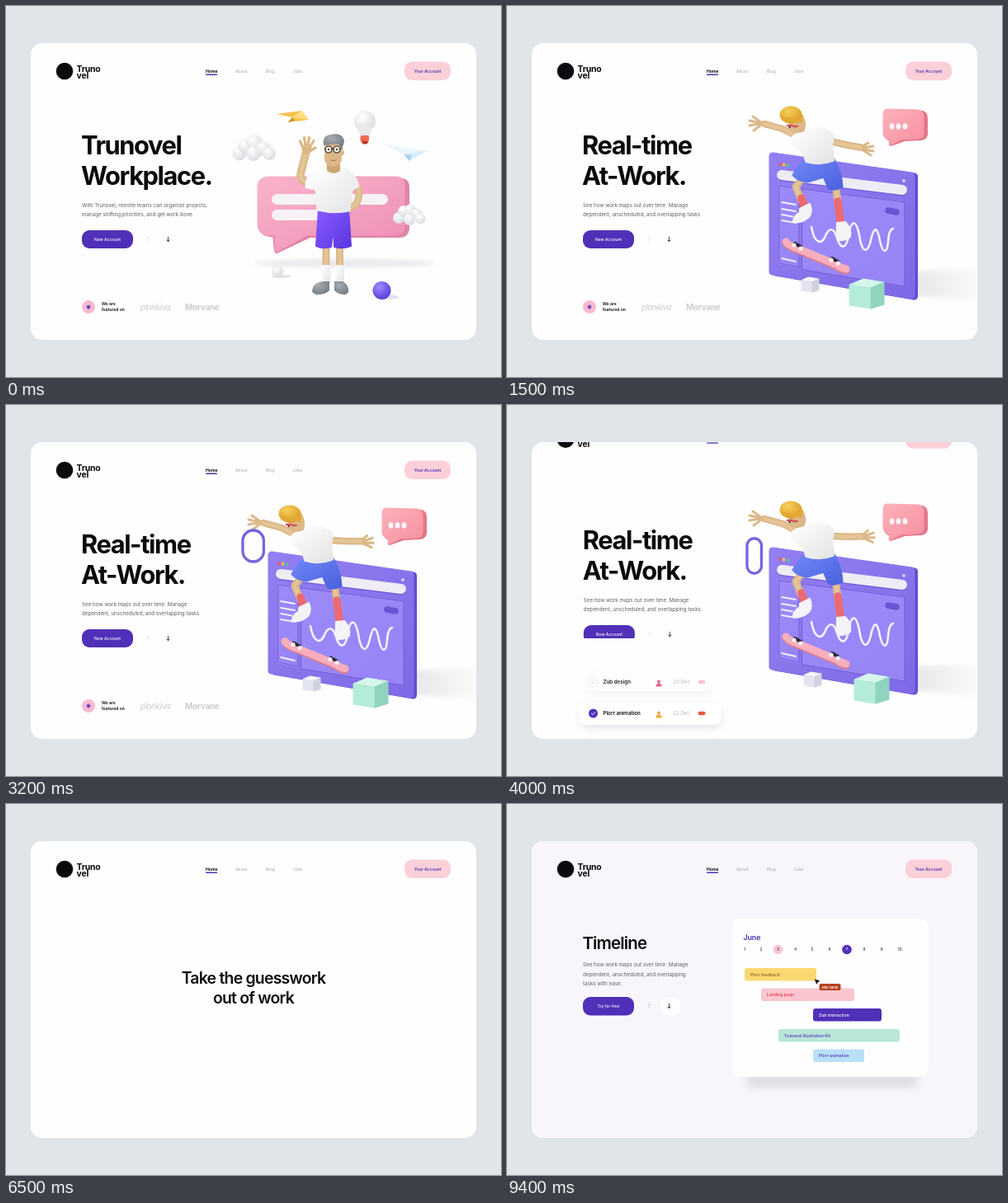
Write an HTML page that moves like this. It is 600 px wide and 450 px high and loops after 9.5 s.

```html
<!DOCTYPE html>
<html lang="en">
<head>
<meta charset="utf-8">
<title>Workplace</title>
<style>
html,body{margin:0;width:100%;height:100%;overflow:hidden;background:#e0e5e9}
svg{display:block;width:100%;height:100%}
text{font-family:Inter,Roboto,sans-serif}
.h{font-size:30.8px;font-weight:700;letter-spacing:-1.4px;fill:#0b0a0e}
.p{font-size:6.25px;fill:#5f5e66}
</style>
</head>
<body>
<svg id="stage" viewBox="0 0 600 450" preserveAspectRatio="xMidYMid meet"></svg>
<script>
const LOOP = 9500, STEP = 100, ZOOM = 0.71, PAN_X = 88, PAN_Y = 66;
const PURPLE = '#5030b8', PINK = '#fbd0d8', TAN = '#dcb888', INK = '#0b0a0e';

// ---- markup helpers ----
const rect = (x, y, w, h, r, fill, more = '') =>
  `<rect x="${x}" y="${y}" width="${w}" height="${h}" rx="${r}" fill="${fill}" ${more}/>`;
const dot = (x, y, r, fill, more = '') => `<circle cx="${x}" cy="${y}" r="${r}" fill="${fill}" ${more}/>`;
const oval = (x, y, rx, ry, fill, more = '') =>
  `<ellipse cx="${x}" cy="${y}" rx="${rx}" ry="${ry}" fill="${fill}" ${more}/>`;
const line = (d, w, color, more = '') =>
  `<path d="${d}" fill="none" stroke="${color}" stroke-width="${w}" stroke-linecap="round" stroke-linejoin="round" ${more}/>`;
const shape = (d, fill, w = 0, more = '') =>
  `<path d="${d}" fill="${fill}" stroke="${fill}" stroke-width="${w}" stroke-linejoin="round" ${more}/>`;
const text = (x, y, size, str, fill = INK, weight = 400, more = '') =>
  `<text x="${x}" y="${y}" font-size="${size}" fill="${fill}" font-weight="${weight}" ${more}>${str}</text>`;
const group = (id, body, more = '') => `<g id="${id}" ${more}>${body}</g>`;
const mid = 'text-anchor="middle"';
const lines = (x, y, gap, list) =>
  list.map((s, i) => `<text class="p" x="${x}" y="${y + i * gap}">${s}</text>`).join('');
const grad = (id, a, b, dir = 'x1="0" y1="0" x2="1" y2="1"') =>
  `<linearGradient id="${id}" ${dir}><stop stop-color="${a}"/><stop offset="1" stop-color="${b}"/></linearGradient>`;
const ball = (id, a, b) =>
  `<radialGradient id="${id}" cx=".38" cy=".3" r=".75"><stop stop-color="${a}"/><stop offset="1" stop-color="${b}"/></radialGradient>`;
const clip = (id, x, y, w, h, r = 0) =>
  `<clipPath id="${id}"><rect id="${id}R" x="${x}" y="${y}" width="${w}" height="${h}" rx="${r}"/></clipPath>`;
const limb = (d, w, base, lit) => line(d, w, base) + line(d, w * 0.5, lit, 'opacity=".55"');
const arrow = (x, y, up, color) => {
  const s = up ? -1 : 1;
  return line(`M${x} ${y - 2.6}V${y + 2.6}M${x - 1.8} ${y + s * 0.9}L${x} ${y + s * 2.7}L${x + 1.8} ${y + s * 0.9}`, 0.75, color);
};
const cloud = (id, puffs) => group(id, puffs.map(([x, y, r]) => dot(x, y, r, 'url(#puff)')).join(''));
const bust = (x, y, color) => dot(x, y - 2, 2, color) + shape(`M${x - 3.5} ${y + 4}q0 -4 3.5 -4t3.5 4z`, color);
const chevron = (x, y, down) =>
  line(down ? `M${x - 2} ${y - 1}l2 2l2 -2` : `M${x - 1} ${y - 2}l2 2l-2 2`, 0.9, INK);

// ---- pieces ----
const defs = `<defs>
${ball('puff', '#ffffff', '#d9d9df')}${ball('violet', '#a08bff', '#5736d6')}${ball('blond', '#f7cf5c', '#d99a22')}
${ball('grey', '#a7adb3', '#757b82')}
${grad('bubble', '#f9b3cc', '#ee8fb4')}${grad('shirt', '#ffffff', '#e4e3e4')}${grad('shorts', '#8a5cff', '#5a36e0')}
${grad('win', '#937ff2', '#8069e6')}${grad('pane', '#9c8af9', '#9784f6')}${grad('jeans', '#7288fa', '#4a62dd')}
${grad('chat', '#fcb1ba', '#f790a0')}
${grad('shade', '#d2d3d8', '#f8f8fa', 'x1="0" x2="1"')}
${clip('cardClip', 30, 45, 540, 360, 14)}${clip('row1', 85, 148, 200, 40)}${clip('row2', 85, 188, 200, 38)}
${clip('btnClip', 85, 268, 80, 32)}
<filter id="soft" x="-30%" y="-60%" width="160%" height="220%"><feGaussianBlur stdDeviation="5"/></filter>
<filter id="soft2" x="-30%" y="-60%" width="160%" height="220%"><feGaussianBlur stdDeviation="2.5"/></filter>
</defs>`;

const wave = () => group('arm',
  limb('M366 215Q354 211 358 200L363 180', 9.5, TAN, '#ecd0a5') +
  oval(364.5, 174, 6, 6.5, TAN) +
  line('M360 172L356.5 164M363 169L361.5 159.5M366 169L367.5 159.5M368.5 171L373 163.5M368 176L375 172', 3.2, TAN));

const manArt = () => group('art1',
  oval(410, 312, 110, 5, '#e9e9ed', 'filter="url(#soft2)"') +
  group('talk',
    shape('M320 212H478Q486 212 486 220V268Q486 278 476 278H368L328 297L326 277Q308 278 308 264V222Q308 212 320 212Z', '#e184a8', 6) +
    shape('M318 209H472Q481 209 481 219V264Q481 276 470 276H364L328 296L328 276H318Q307 275 307 264V220Q307 210 318 209Z', 'url(#bubble)', 5) +
    rect(322, 228, 141, 13, 6.5, '#f7f2f5') + rect(322, 247, 89, 13, 6.5, '#f7f2f5')) +
  cloud('cloudA', [[283, 179, 8.5], [290, 170, 9], [301, 166, 10], [312, 173, 9], [319, 179, 8], [300, 179, 9]]) +
  cloud('cloudB', [[476, 257, 7], [482, 249, 7], [490, 248, 7.5], [498, 252, 6.5], [502, 258, 6.5], [489, 259, 7]]) +
  group('planeA', shape('M328 131L358 127L367 138L342 141L347 135Z', '#f5c44e') + shape('M347 135L358 127L367 138Z', '#ffdc7d') + shape('M342 141L347 135L350 139Z', '#c99022')) +
  group('planeB', shape('M459 168L510 176L497 183L489 188L482 180Z', '#d5ecf9') + shape('M459 168L510 176L482 180Z', '#ebf7fd') + shape('M482 180L489 188L492 181Z', '#a9d4ee')) +
  group('bulb', dot(435, 140, 13, 'url(#puff)') + shape('M425 147L430 158H440L445 147Z', '#e9e9ee') + rect(429.5, 157, 10.5, 8, 2, '#f0694f') + oval(435, 165.5, 3.6, 2, '#b33c2c')) +
  limb('M388 285V322', 9, TAN, '#ecd0a5') + limb('M404.5 285V322', 9, TAN, '#ecd0a5') +
  rect(382.5, 314, 11, 24, 3, 'url(#shirt)') + rect(399, 314, 11, 24, 3, 'url(#shirt)') +
  shape('M371 347Q371 336 384 334H392V345Q388 350 376 350Z', 'url(#grey)') + shape('M415 347Q416 338 408 334H398V345Q402 350 412 350Z', 'url(#grey)') +
  shape('M379 246H415L418 291Q408 295 398 292L397 267L394 292Q384 295 376 291Z', 'url(#shorts)', 2) +
  limb('M421 212Q433 226 424 241L416 245', 8.5, TAN, '#ecd0a5') +
  wave() +
  shape('M384 199Q397 205 410 198Q422 201 427 218L419 223L416 248Q398 252 378 247L376 222L364 220Q364 207 372 201Z', 'url(#shirt)', 3) +
  shape('M389 188H405V200Q397 206 389 200Z', '#cda673') +
  rect(386, 161, 21, 34, 10, TAN) + dot(407, 178, 3, TAN) +
  shape('M386 168Q384 158 394 157Q407 154 409 164L407 171L403 166Z', 'url(#grey)', 2) +
  line('M386 173H408', 0.8, '#2a2230') +
  dot(391, 174, 4, '#f2ead8', 'stroke="#2a2230" stroke-width="1.2"') + dot(401, 174, 4, '#f2ead8', 'stroke="#2a2230" stroke-width="1.2"') +
  dot(391, 174, 1, INK) + dot(401, 174, 1, INK) + line('M394 187q3 1.6 6 0', 1, '#a4744e') +
  oval(334, 328, 12, 2, '#e3e3e8') + dot(329, 322, 7, 'url(#puff)') +
  oval(462, 353, 14, 3, '#e2dff0') + dot(455.5, 345, 11, 'url(#violet)'));

const cube = (id, x, y, w, a, b, c) => group(id,
  shape(`M${x} ${y + w * .17}L${x + w * .4} ${y}L${x + w} ${y + w * .1}L${x + w * .62} ${y + w * .26}Z`, a, 1) +
  shape(`M${x} ${y + w * .17}L${x + w * .62} ${y + w * .26}V${y + w * .86}L${x} ${y + w * .76}Z`, b, 1) +
  shape(`M${x + w * .62} ${y + w * .26}L${x + w} ${y + w * .1}V${y + w * .74}L${x + w * .62} ${y + w * .86}Z`, c, 1));

const windowArt = () =>
  shape('M496 322L572 318V358L496 352Z', 'url(#shade)', 0, 'filter="url(#soft2)" opacity=".5"') +
  shape('M325 183L493.5 207V352L326 323Z', '#654ed0', 9) +
  shape('M322 182L490 206V351L322 322Z', 'url(#win)', 9) +
  ['#f0546a', '#f5c04a', '#4acb8f'].map((c, i) => oval(331 + i * 4.7, 192 + i * .7, 1.8, 2.1, c)).join('') +
  dot(481, 212, 1.8, '#e9e4ff') +
  line('M333 206L479 224', 12.5, '#6f59d4') + line('M333 205L479 223', 12, '#efecf6') +
  shape('M330 218L353 221V317L330 312Z', 'url(#pane)', 3) +
  line('M330 218L354 221V317L330 312Z', 1, '#745ed8') +
  shape('M360 224L480 239V338L360 318Z', 'url(#pane)', 4) + line('M358 222L482 238V340L358 320Z', 1, '#745ed8') +
  line('M333 238L350 241M333 246L350 249M333 253L346 255.5M333 260L350 263M333 306L350 310', 1.8, '#f1eefb') +
  line('M462 248L472 250', 7.5, '#6b54d4') +
  line('M369 268C373 290 381 288 385 281C390 268 396 268 400 281C404 295 411 296 414 279C417 259 423 258 427 278C430 299 437 302 441 284C445 266 449 268 452 285C456 302 461 300 462 285Q463 271 468 270', 2.6, '#f5f2fc');

const boyArt = () => group('boy',
  limb('M356 160L334 149L312 143', 8.5, TAN, '#ecd0a5') +
  line('M309 142L298 134M307 142L294 139M306 143L294 145M307 145L299 151', 3, TAN) +
  group('reach', limb('M392 164L414 169L432 172', 8.5, TAN, '#ecd0a5') +
    line('M432 172L444 170M433 174L444 176M432 175L441 181M431 170L438 166', 3, TAN)) +
  limb('M360 206L350 219L357 236', 9, TAN, '#ecd0a5') +
  limb('M398 216L402 246', 9, TAN, '#ecd0a5') +
  line('M357 233L361 246', 9.5, '#ec6a72') + line('M401 237L404 262', 9.5, '#ec6a72') +
  shape('M355 246L367 240Q371 250 366 256Q357 264 347 262Q346 256 355 250Z', '#f4f4f6', 2) +
  shape('M400 263L410 262Q418 270 416 280Q410 285 401 284Q399 274 400 263Z', '#f4f4f6', 2) +
  shape('M364 184L396 186Q405 201 406 219Q398 224 390 221L384 207L364 213Q353 212 347 205Q354 193 364 184Z', 'url(#jeans)', 3) +
  shape('M347 159Q358 151 374 149Q388 150 395 157L393 170L395 187Q380 193 363 188Q361 175 346 167Z', 'url(#shirt)', 4) +
  shape('M343 140Q345 130 355 130Q364 139 360 151Q351 156 343 148Z', TAN, 2) +
  oval(344, 132, 13.5, 10.5, 'url(#blond)') + shape('M331 132Q339 138 355 135L359 131L357 142L337 139Z', '#e3a935') +
  line('M340 145h5.5M347.5 146h4', 2.6, '#d4505c') + dot(342.5, 147, 1, INK));

const boardArt = () => group('board',
  line('M338 287Q342 293 353 296L398 315Q405 320 411 321', 9.5, '#d77f95') +
  line('M338 286Q342 291 353 294.5L399 313.5Q405 318 411 319', 9, '#f8aebd') +
  [[352, 291], [397, 309]].map(([x, y]) => line(`M${x - 3} ${y - 3}l7 4`, 4, '#2b2735') + dot(x - 4, y - 1, 2.6, '#f5f2f4') + dot(x + 4, y + 3, 2.6, '#f5f2f4')).join(''));

const skateArt = () => group('art2',
  windowArt() + boardArt() + boyArt() +
  cube('cubeA', 357, 329, 21, '#f7f7fa', '#e4e5ee', '#cfd2de') + cube('cubeB', 415, 331, 42, '#d4f7ea', '#b4ecd9', '#8fd4be') +
  group('chatBox',
    shape('M462 127L504 128Q509 130 509 136V156Q508 161 502 162L482 163L465 169L466 163Q458 162 458 155V133Q458 127 462 127Z', '#e5768a', 2) +
    shape('M461 126L498 127Q504 128 504 134V155Q503 160 498 160L478 161L464 168L465 161Q457 160 457 154V131Q457 126 461 126Z', 'url(#chat)', 3) +
    [466.5, 474.5, 482.5].map(x => oval(x, 146, 2.9, 3.8, '#fff6f7')).join('')));

const logo = (x, y, k) => dot(x, y, 10.3 * k, INK) +
  text(x + 14.6 * k, y + 1 * k, 10.4 * k, 'Truno', INK, 700, 'letter-spacing="-.2"') +
  text(x + 14.6 * k, y + 9.4 * k, 10.4 * k, 'vel', INK, 700, 'letter-spacing="-.2"');

const nav = () => group('nav', logo(71, 79, 1) +
  text(242, 81, 5.1, 'Home', INK, 700) + rect(242, 82.6, 14, 1.4, 0.7, PURPLE) +
  [[278, 'About'], [315, 'Blog'], [347.5, 'Jobs']].map(([x, s]) => text(x, 81, 5.1, s, '#a5a4ab')).join('') +
  rect(483, 67.5, 56, 22.5, 9, PINK) + text(511, 80.8, 5, 'Your Account', PURPLE, 600, mid));

const heading = () => ['Trunovel|Real-time', 'Workplace.|At-Work.'].map((pair, i) => {
  const [a, b] = pair.split('|'), y = 180 + i * 37;
  return `<g clip-path="url(#row${i + 1})"><text class="h outgo" x="91" y="${y}">${a}</text><text class="h income" x="91" y="${y}">${b}</text></g>`;
}).join('');

const task = (id, y, big, name, date, tone, pill) => group(id,
  (big ? rect(89, y - 9, 170, 27, 9, '#c9c8d4', 'filter="url(#soft)" opacity=".5"') + rect(87, y - 13, 173, 27, 8, '#fff')
    : rect(99, y - 7, 148, 20, 8, '#d5d4dc', 'filter="url(#soft)" opacity=".4"') + rect(97, y - 11, 152, 22, 7, '#fff')) +
  dot(104.5, y, 5.5, big ? PURPLE : '#fff', big ? '' : 'stroke="#dddce4" stroke-width=".8"') +
  line(`M102.4 ${y}l1.6 1.6l2.8 -3`, 0.9, big ? '#fff' : '#d0cfd8') +
  text(116.5, y + 2.2, 6.2, name, INK, 600) + bust(184, y + 1.5, tone) +
  text(201.5, y + 2.2, 6, date, '#b3b2ba') + rect(231.5, y - 2.3, 9, 4.6, 2.3, pill));

const hero = () => group('hero', manArt() + skateArt() +
  group('ringBox', '<rect id="ring" fill="none" stroke="#7565de" stroke-width="3.3"/>') +
  group('copy', heading() +
    group('descA', lines(92, 243.6, 11.6, ['With Trunovel, remote teams can organize projects,', 'manage shifting priorities, and get work done.'])) +
    group('descB', lines(92, 243.6, 11.6, ['See how work maps out over time. Manage', 'dependent, unscheduled, and overlapping tasks.'])) +
    `<g clip-path="url(#btnClip)">${rect(92, 272, 62, 22, 9, PURPLE)}${text(123, 285, 5, 'New Account', '#fff', 500, mid)}</g>` +
    arrow(172, 283, true, '#e3e2e8') + arrow(196.5, 283, false, INK)) +
  group('featured', dot(100, 365, 8, '#f9b9d1') +
    group('star', line('M0 -2.3V2.3M-2 -1.15L2 1.15M-2 1.15L2 -1.15', 1.1, PURPLE)) +
    text(116, 363.4, 5, 'We are', INK, 600) + text(116, 370, 5, 'featured on', INK, 600) +
    text(163, 369, 10, 'plonkiva', '#cdccd2', 400, 'font-style="italic" letter-spacing="-.5"') + text(217, 369, 10, 'Morvane', '#cdccd2', 700, 'letter-spacing="-.3"')) +
  task('taskA', 336, false, 'Zub design', '20 Dec', '#e8528a', '#f9bfc9') +
  task('taskB', 374, true, 'Plorr animation', '22 Dec', '#f0a93c', '#e4573d'));

const DAYS = [288, 308, 328.5, 349.5, 370, 391, 412, 433, 454, 476];
const BARS = [
  [288, 199, 87, '#fbd972', 'Plorr feedback', '#8a5a1a'], [308, 223.5, 113, '#fbc5cf', 'Landing page', '#e0384e'],
  [371, 248, 83, PURPLE, 'Zub interaction', '#fff'], [329, 273, 147, '#b9e6d8', 'Trunovel illustration Kit', PURPLE],
  [371, 297.5, 62, '#b8e0f7', 'Plorr animation', PURPLE]];

const timeline = () => group('timeline',
  group('tlTitle', text(91.5, 175.5, 20.4, 'Timeline', INK, 600, 'letter-spacing="-.85"') +
    lines(92, 197.3, 11.2, ['See how work maps out over time. Manage', 'dependent, unscheduled, and overlapping', 'tasks with ease.'])) +
  group('tlBtn', rect(92, 234, 62, 22.5, 9, PURPLE) + text(123, 247, 5, 'Try for free', '#fff', 500, mid) +
    rect(186, 234, 24, 22, 9, '#fdfcfe') + arrow(172, 245, true, '#c9c8d0') + arrow(196.5, 245, false, INK)) +
  group('tlPanel', rect(290, 318, 208, 27, 8, '#d6d4dc', 'filter="url(#soft)" opacity=".65"') + rect(272.5, 139, 238, 192, 9, '#fefefe') +
    text(286.5, 165, 9, 'June', PURPLE, 600, 'letter-spacing="-.2"') + dot(328.5, 176.5, 5.8, '#f9c6d3') + dot(412, 176.5, 5.8, PURPLE) +
    DAYS.map((x, i) => text(x, 178.3, 4.9, i + 1, i === 6 ? '#fff' : '#33313b', 500, mid)).join('') +
    BARS.map(([x, y, , c, s, ink], i) => rect(x, y, 0, 15.5, 3, c, `id="bar${i}"`) + text(x + 7, y + 9.6, 5.1, s, ink, 500, `id="lab${i}"`)).join('') +
    group('cursor', shape('M0 0L5 1.8L2.8 2.9L1.8 5Z', INK, 1) + rect(5, 5, 26, 8, 2, '#b8401f') + text(18, 10.6, 4, 'Nilo Varek', '#fff', 600, mid))));

const section = () => group('section', rect(30, 45, 540, 380, 0, '#fefefe') +
  group('claim', ['Take the guesswork', 'out of work'].map((s, i) =>
    text(300, 217.5 + i * 24, 19.4, s, '#b0afb4', 600, `${mid} letter-spacing="-.75" class="claim"`)).join('')));

const dash = () => {
  const side = [['Home', 124], ['Boards', 167], ['Message', 211], ['Analytics', 253]].map(([s, y], i) => {
    const on = i === 1, c = on ? INK : '#b4b3bb';
    const icon = on ? [0, 1, 2, 3].map(n => line(`M${70 + n % 2 * 4} ${y - 2 + (n >> 1) * 4}h1.2v1.2h-1.2z`, 1, c)).join('')
      : rect(70, y - 3, 6, 6, 2, 'none', `stroke="${c}" stroke-width=".8"`);
    return icon + text(73, y + 15.3, 5.9, s, c, on ? 700 : 500, mid);
  }).join('');
  const tags = [['Interact', '#f49ab8'], ['Promo', PURPLE], ['Motion', '#5cc9d6'], ['3D Design', '#8fe0c4']]
    .map(([s, c], i) => dot(509.5, 169 + i * 9.6, 1.4, c) + text(516, 170.8 + i * 9.6, 4.9, s, '#77767e')).join('');
  const faces = ['#f28fb2', '#f3c391', '#8aa7c9'].map((c, i) => dot(513.5 + i * 9, 154, 5.3, c, 'stroke="#fff" stroke-width=".8"') + bust(513.5 + i * 9, 154, '#59445f')).join('');
  return group('dash', rect(40, 57, 525, 336, 14, '#f6f5f8') + logo(59.5, 77, 0.69) +
    [[109, 'List'], [134.5, 'Boards'], [168, 'Timeline'], [205, 'Calendar']].map(([x, s], i) => text(x, 79, 5.5, s, i === 1 ? INK : '#96959d', i === 1 ? 700 : 400)).join('') +
    rect(410, 69, 85, 15, 6, '#fdfdfe') + text(449, 78.4, 5, 'Search', '#b6b5bd', 400, mid) +
    rect(508, 69, 41, 15.5, 6, PURPLE) + line('M526.3 76.7h4.4M528.5 74.5v4.4', 0.9, '#fff') +
    rect(55, 162, 38, 33, 7, '#d5d3de', 'filter="url(#soft2)" opacity=".6"') + rect(53, 156, 42, 38, 7, '#fff') + side +
    dot(72.5, 328, 9.6, '#4a3cc6') + dot(72.5, 328, 5, '#62c3d8') +
    text(72.5, 348, 5.5, 'lorvekunadrim', INK, 700, mid) + text(72.5, 356, 5, 'Visual Designer', '#aaa9b1', 400, mid) + chevron(72.5, 365, true) +
    text(508, 126.3, 5, 'Team', '#b0afb7') + line('M544.5 124.5h3.6M546.3 122.7v3.6', 0.6, '#aaa') +
    text(508, 141, 5.8, 'Plorr.', INK, 700) + chevron(546.5, 139, true) + faces + dot(540.5, 154, 5.3, PURPLE) + line('M538.7 154h3.6M540.5 152.2v3.6', 0.7, '#fff') + tags +
    [['Zub.', 221], ['Marketing.', 239], ['Dem.', 257]].map(([s, y]) => text(508, y, 5.8, s, INK, 700) + chevron(547, y - 2, false)).join('') +
    line('M537 322L548 333', 4, PURPLE) + dot(528, 313, 10.5, '#d9f2f8', 'stroke="#7565de" stroke-width="2.6"') +
    text(529, 345.5, 4.1, 'Invite your team and', '#55545c', 400, mid) + text(529, 351, 4.1, 'start collaborating!', '#55545c', 400, mid) +
    rect(508, 362, 43, 14, 5, '#fff') + text(529.5, 371, 5.2, 'Invite', INK, 700, mid),
    `transform="scale(${1 / ZOOM}) translate(${-PAN_X} ${-PAN_Y})"`);
};

const stage = document.getElementById('stage');
stage.innerHTML = defs + rect(0, 0, 600, 450, 0, '#e0e5e9') + rect(0, 0, 600, 450, 0, '#fdfdfe', 'id="paper"') +
  group('cam', dash() + `<g clip-path="url(#cardClip)">` + rect(30, 45, 540, 420, 0, '#fefefe') + hero() + section() +
    rect(30, 45, 540, 420, 0, '#f8f6fa', 'id="tint"') + timeline() + nav() + '</g>');

// ---- motion ----
const $ = id => document.getElementById(id);
const set = (id, name, v) => $(id).setAttribute(name, v);
const move = (id, x, y) => set(id, 'transform', `translate(${x} ${y})`);
const fade = (id, v) => set(id, 'opacity', v);
const clamp = p => Math.max(0, Math.min(1, p));
const inOut = p => p < 0.5 ? 4 * p ** 3 : 1 - 4 * (1 - p) ** 3;
const outCubic = p => 1 - (1 - p) ** 3;
// eased value through time/value pairs
function key(t, ...k) {
  if (t <= k[0]) return k[1];
  for (let i = 2; i < k.length; i += 2) {
    if (t <= k[i]) return k[i - 1] + (k[i + 1] - k[i - 1]) * inOut((t - k[i - 2]) / (k[i] - k[i - 2]));
  }
  return k[k.length - 1];
}
const bob = (t, amp, period, phase = 0) => amp * (Math.sin(t / period * 2 * Math.PI + phase) - Math.sin(phase));
// the whole hero scrolls up a little once the tasks arrive
const lift = t => key(t, 3500, 0, 4000, -5, 5600, -7);

function drawMan(t) {
  $('art1').style.display = t > 1250 ? 'none' : '';
  set('arm', 'transform', `rotate(${bob(t, 8, 600)} 359 205)`);
  move('cloudA', bob(t, 2, 2000), 0);
  move('cloudB', bob(t, -2, 2000), 0);
  move('planeA', bob(t, 2, 1800), bob(t, -2, 1800));
  move('planeB', bob(t, -2, 1900), bob(t, 2, 1900));
  move('bulb', 0, bob(t, -2.5, 1600));
  fade('art1', key(t, 750, 1, 1150, 0));
  move('art1', 0, key(t, 700, 0, 1200, -40));
}

function drawSkater(t) {
  fade('art2', key(t, 850, 0, 1250, 1));
  move('art2', 0, key(t, 850, 50, 1450, 0) + lift(t));
  set('reach', 'transform', `rotate(${key(t, 1500, 0, 4000, -11)} 392 164)`);
  move('board', 0, bob(t - 1500, 0.8, 1250));
  const slide = key(t, 1500, 0, 2300, 1);
  move('cubeA', slide * 3, 0);
  move('cubeB', slide * 6, 0);
  const w = key(t, 2400, 33.5, 4000, 17.5, 5600, 21.5), h = key(t, 2400, 33.5, 4000, 42.5, 5600, 33);
  const y = key(t, 2400, 159, 4000, 183, 5600, 178);
  const box = { x: 299.7 - w / 2, y: y - h / 2, width: w, height: h, rx: w / 2 };
  for (const n in box) set('ring', n, box[n]);
  fade('ringBox', key(t, 2000, 0, 2300, 1));
}

function drawHero(t) {
  const out = key(t, 700, 0, 1100, -42), come = key(t, 900, 42, 1400, 0);
  document.querySelectorAll('.outgo').forEach(e => e.setAttribute('transform', `translate(0 ${out})`));
  document.querySelectorAll('.income').forEach(e => e.setAttribute('transform', `translate(0 ${come})`));
  fade('descA', key(t, 700, 1, 1000, 0));
  fade('descB', key(t, 1000, 0, 1350, 1));
  move('copy', -lift(t) / 6, lift(t));
  set('btnClipR', 'height', key(t, 3450, 32, 3700, 0, 4250, 32));
  set('star', 'transform', `translate(100 365) rotate(${t * 0.06})`);
  fade('featured', key(t, 3250, 1, 3550, 0));
  fade('taskA', key(t, 3450, 0, 4000, 0.9, 4300, 1));
  move('taskA', 0, key(t, 3450, 60, 3950, 0));
  fade('taskB', key(t, 3600, 0, 3950, 1));
  move('taskB', 0, key(t, 3550, 60, 4000, 0));
  $('hero').style.display = t > 5950 ? 'none' : '';
}

function drawClaim(t) {
  move('section', 0, key(t, 5300, 360, 5866, 0));
  $('section').style.display = t < 5300 ? 'none' : '';
  document.querySelectorAll('.claim').forEach((e, i) => {
    const g = Math.round(key(t, 5750 + i * 200, 176, 6350 + i * 200, 14));
    e.setAttribute('fill', `rgb(${g},${g},${g})`);
  });
  fade('claim', key(t, 6850, 1, 7250, 0));
  move('claim', 0, key(t, 6800, 0, 7350, -90));
  fade('tint', key(t, 6850, 0, 7400, 1));
}

function drawTimeline(t) {
  const rest = 1 - outCubic(clamp((t - 7400) / 1000));
  fade('timeline', key(t, 7350, 0, 7750, 1));
  move('tlTitle', 0, rest * 80);
  move('tlBtn', 0, rest * 136);
  move('tlPanel', 0, rest * 96);
  fade('tlBtn', key(t, 7500, 0, 8150, 1));
  BARS.forEach(([, , w], i) => {
    const start = 7950 + i * 130;
    const full = i ? w : key(t, 8800, 64, 9300, w);
    set('bar' + i, 'width', full * outCubic(clamp((t - start) / 500)));
    fade('lab' + i, key(t, start + 150, 0, start + 450, 1));
  });
  fade('cursor', key(t, 8500, 0, 8750, 1));
  move('cursor', key(t, 8450, 400, 8800, 350.5, 9300, 373.5), key(t, 8450, 245, 8800, 213));
}

function draw(now) {
  const t = Math.floor(now % LOOP / STEP) * STEP;
  const zoom = key(t, 2000, 0, 2400, 1, 2650, 1, 3000, 0);
  set('cam', 'transform', `translate(${PAN_X * zoom} ${PAN_Y * zoom}) scale(${1 - (1 - ZOOM) * zoom})`);
  set('cardClipR', 'height', 360 + 37 * zoom);
  fade('paper', zoom);
  fade('dash', zoom);
  fade('nav', clamp(1 - zoom * 2));
  move('nav', 0, key(t, 3700, 0, 4200, -50, 5350, -50, 5900, 0));
  drawMan(t);
  drawSkater(t);
  drawHero(t);
  drawClaim(t);
  drawTimeline(t);
}

const began = performance.now();
function tick() {
  draw(performance.now() - began);
  requestAnimationFrame(tick);
}
draw(0);
requestAnimationFrame(tick);
</script>
</body>
</html>
```
